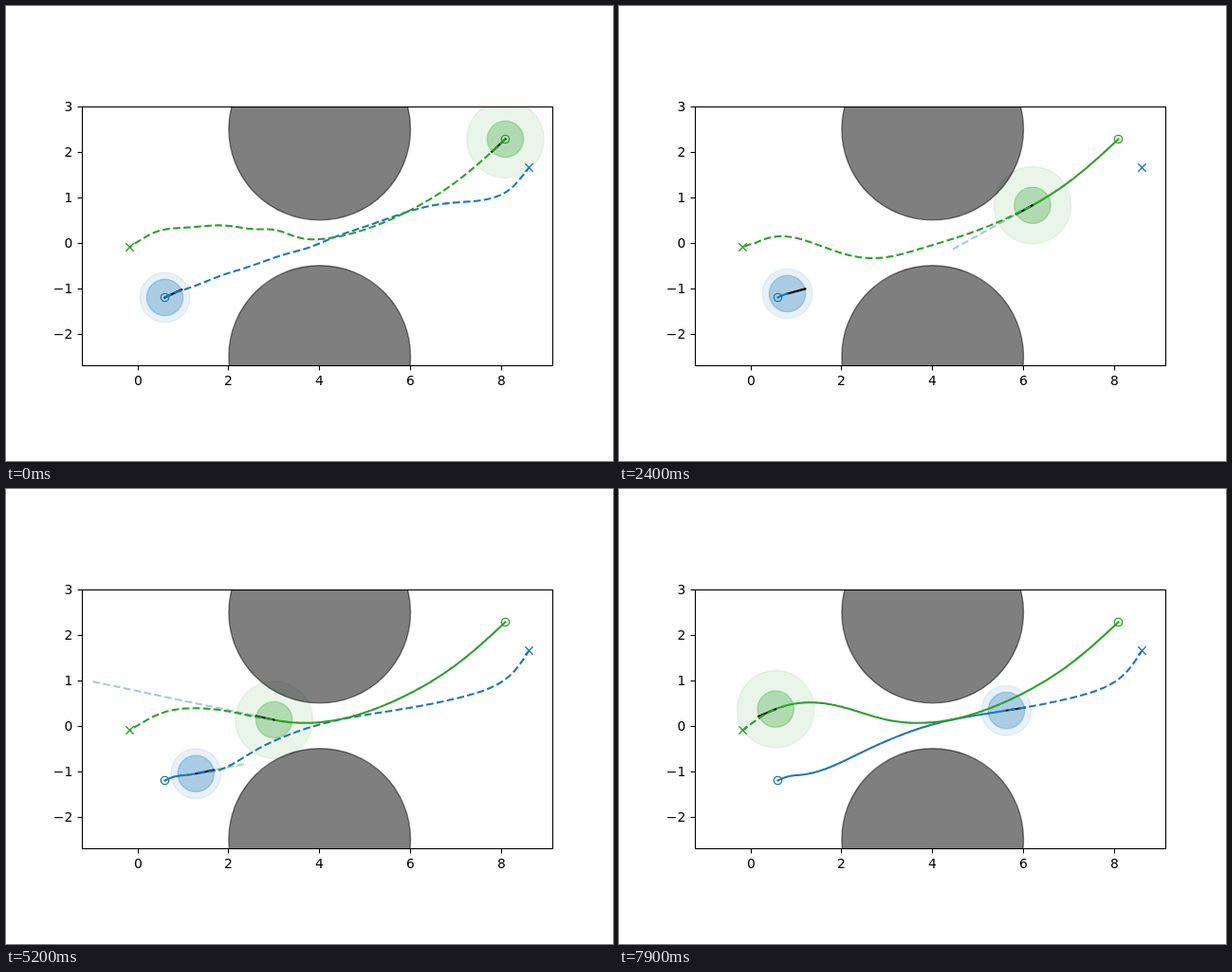
Write an HTML page that moves like this. It is 640x480 px and loops after 8000 ms.

```html
<!DOCTYPE html>
<html lang="en">
<head>
<meta charset="utf-8">
<title>Two robots in a narrow passage</title>
<style>
html, body { margin: 0; width: 100%; height: 100%; overflow: hidden; background: #fff; }
svg { display: block; width: 640px; height: 480px; }
text { font: 13.89px "DejaVu Sans", sans-serif; fill: #000; }
.frame, .tick { fill: none; stroke: #000; stroke-width: 1.1; }
.wall { fill: #000; stroke: #000; stroke-width: 1.39; fill-opacity: .5; stroke-opacity: .5; }
.green { --c: #2ca02c; }
.blue { --c: #1f77b4; }
.disc { fill: var(--c); stroke: var(--c); stroke-width: 1.39; }
.halo { fill-opacity: .1; stroke-opacity: .1; }
.body { fill-opacity: .3; stroke-opacity: .3; }
.trail, .plan, .guess { fill: none; stroke: var(--c); stroke-width: 2.08; stroke-linejoin: round; }
.trail { stroke-linecap: square; }
.plan, .guess { stroke-dasharray: 7.71 3.33; }
.guess { opacity: .4; }
.nose { stroke: #000; stroke-width: 2.08; stroke-linecap: square; }
.mark { fill: none; stroke: var(--c); stroke-width: 1.39; }
</style>
</head>
<body>
<svg viewBox="-0.5 -0.5 640 480">
  <clipPath id="box"><rect x="80" y="106" width="496" height="273"/></clipPath>
  <g clip-path="url(#box)">
    <g id="discs"></g>
    <g id="walls"></g>
    <g id="lines"></g>
  </g>
  <g id="axes"><rect class="frame" x="80" y="106" width="496" height="273"/></g>
</svg>
<script>
const STEP = 100, STEPS = 80;
const UNIT = 47.9;
const REPLAN = 0.6, RESUME = 4.1, PASSED = 6.2; // phase limits in seconds

const X = v => 138.6 + v * UNIT;
const Y = v => 249.3 - v * UNIT;
const mix = (a, b, u) => a + (b - a) * u;
const clamp = u => Math.min(1, Math.max(0, u));

// Time spent at full speed, counting a linear speed-up of the given length.
function ramp(t, start, length) {
  const u = Math.max(0, t - start);
  return u < length ? u * u / (2 * length) : u - length / 2;
}

// Natural cubic spline of one coordinate over the knots s.
function natural(s, v) {
  const n = s.length, c = Array(n).fill(0), k = Array(n).fill(0), bend = Array(n).fill(0);
  for (let i = 1; i < n - 1; i++) {
    const a = s[i] - s[i - 1], b = s[i + 1] - s[i];
    const d = 2 * (a + b) - a * c[i - 1];
    c[i] = b / d;
    k[i] = (6 * ((v[i + 1] - v[i]) / b - (v[i] - v[i - 1]) / a) - a * k[i - 1]) / d;
  }
  for (let i = n - 2; i > 0; i--) bend[i] = k[i] - c[i] * bend[i + 1];
  return p => {
    let i = 0;
    while (i < n - 2 && p > s[i + 1]) i++;
    const h = s[i + 1] - s[i], u = (p - s[i]) / h, w = 1 - u;
    return w * v[i] + u * v[i + 1] + h * h / 6 * ((w ** 3 - w) * bend[i] + (u ** 3 - u) * bend[i + 1]);
  };
}

// Smooth route through a few points, measured by distance along it.
function route(points) {
  const s = [0];
  for (let i = 1; i < points.length; i++) {
    s[i] = s[i - 1] + Math.hypot(points[i][0] - points[i - 1][0], points[i][1] - points[i - 1][1]);
  }
  const x = natural(s, points.map(p => p[0])), y = natural(s, points.map(p => p[1]));
  return {
    length: s[s.length - 1],
    at: d => [x(d), y(d)],
    heading: d => Math.atan2(y(d + .5) - y(d - .5), x(d + .5) - x(d - .5))
  };
}

const bump = (x, centre, height, width) => height * Math.exp(-(((x - centre) / width) ** 2) / 2);
const settle = t => clamp((6 - t) / 1.7);

// detour: how far the current plan bends away from the final route at x.
const green = {
  name: "green", other: "blue", halo: 0.85,
  route: route([[526, 140], [474, 185], [409, 223], [336, 245], [282, 243],
    [237, 230], [200, 224.7], [164, 232], [130, 254]]),
  travelled: t => 57 * (ramp(t, 0, .78) - ramp(t, 5.9, 3.4)),
  planned: () => true,
  detour: (t, x) => {
    if (t < REPLAN) return bump(x, 284, -7.5, 16) + bump(x, 194, 8, 25);
    return t < RESUME ? bump(x, 238, 31, 51) : settle(t) * bump(x, 205, 13, 42);
  },
  guessEnd: t => t < RESUME ? mix(374, 329, (t - 1.6) / 1.6) : X(-1),
  guesses: t => t >= REPLAN && t < PASSED
};

const blue = {
  name: "blue", other: "green", halo: 0.55,
  route: route([[167, 307], [177, 303], [192, 301], [254, 278], [330, 248],
    [409, 233], [480, 219], [530, 197], [551, 170]]),
  travelled: t => 24 * (ramp(t, 0, .3) - ramp(t, .45, .3)) + 85 * ramp(t, 4.3, 1.5),
  planned: t => t < REPLAN || t >= RESUME,
  detour: (t, x) => t < REPLAN
    ? bump(x, 220, -7.5, 25) + bump(x, 318, 3.5, 18) + bump(x, 447, -16, 48)
    : settle(t) * bump(x, 232, 9, 20),
  guessEnd: (t, x) => x + mix(70, 29, settle(t)),
  guesses: t => t >= RESUME && t < PASSED
};

const [discs, walls, lines, axes] =
  ["discs", "walls", "lines", "axes"].map(id => document.getElementById(id));

function add(parent, tag, attrs, text) {
  const el = document.createElementNS("http://www.w3.org/2000/svg", tag);
  for (const k in attrs) el.setAttribute(k, attrs[k]);
  if (text) el.textContent = text;
  return parent.appendChild(el);
}

for (const v of [2.5, -2.5]) add(walls, "circle", { class: "wall", cx: X(4), cy: Y(v), r: 2 * UNIT });

for (let v = 0; v <= 8; v += 2) {
  const x = Math.round(X(v));
  add(axes, "path", { class: "tick", d: `M${x} 379v4.9` });
  add(axes, "text", { x, y: 399.5, "text-anchor": "middle" }, String(v));
}
for (let v = -2; v <= 3; v++) {
  const y = Math.ceil(Y(v));
  add(axes, "path", { class: "tick", d: `M80 ${y}h-4.9` });
  add(axes, "text", { x: 69.8, y: y + 4.5, "text-anchor": "end" }, String(v).replace("-", "\u2212"));
}

const robots = [blue, green];
for (const r of robots) {
  const disc = add(discs, "g", { class: r.name });
  r.discs = [
    add(disc, "circle", { class: "disc halo", r: r.halo * UNIT }),
    add(disc, "circle", { class: "disc body", r: 0.4 * UNIT })
  ];
  const g = add(lines, "g", { class: r.name });
  r.guess = add(add(g, "g", { class: r.other }), "path", { class: "guess" });
  r.nose = add(g, "path", { class: "nose" });
  r.trail = add(g, "path", { class: "trail" });
  r.plan = add(g, "path", { class: "plan" });
  const [sx, sy] = r.route.at(0), [gx, gy] = r.route.at(r.route.length);
  add(g, "circle", { class: "mark", cx: sx, cy: sy, r: 4.17 });
  add(g, "path", { class: "mark", d: `M${gx - 4.2} ${gy - 4.2}l8.4 8.4m0 -8.4l-8.4 8.4` });
}

function trace(at, from, to) {
  const n = Math.max(1, Math.ceil((to - from) / 2));
  const points = Array.from({ length: n + 1 }, (_, i) =>
    at(mix(from, to, i / n)).map(v => v.toFixed(2)).join(" "));
  return "M" + points.join("L");
}

function drawRobot(r, t) {
  const { at, heading, length } = r.route;
  const s = r.travelled(t), [x, y] = at(s), angle = heading(s);
  for (const c of r.discs) {
    c.setAttribute("cx", x);
    c.setAttribute("cy", y);
  }
  r.nose.setAttribute("d", `M${x} ${y}l${19.5 * Math.cos(angle)} ${19.5 * Math.sin(angle)}`);

  const end = r.guessEnd(t, x);
  r.guess.setAttribute("d", r.guesses(t) ? `M${x} ${y}L${end} ${y + (end - x) * Math.tan(angle)}` : "");

  // The dashed plan starts slightly behind the robot and is pinned at both ends.
  const planned = r.planned(t);
  const tail = planned ? Math.max(0, s - 9) : s;
  const planAt = d => {
    const [px, py] = at(d);
    return [px, py + r.detour(t, px) * clamp((d - s) / 25) * clamp((length - d) / 15)];
  };
  r.trail.setAttribute("d", tail > 0 ? trace(at, 0, tail) : "");
  r.plan.setAttribute("d", planned ? trace(planAt, tail, length) : "");
}

const begin = performance.now();
function tick() {
  const t = Math.floor((performance.now() - begin) / STEP) % STEPS * STEP / 1000;
  for (const r of robots) drawRobot(r, t);
  requestAnimationFrame(tick);
}
tick();
</script>
</body>
</html>
```
